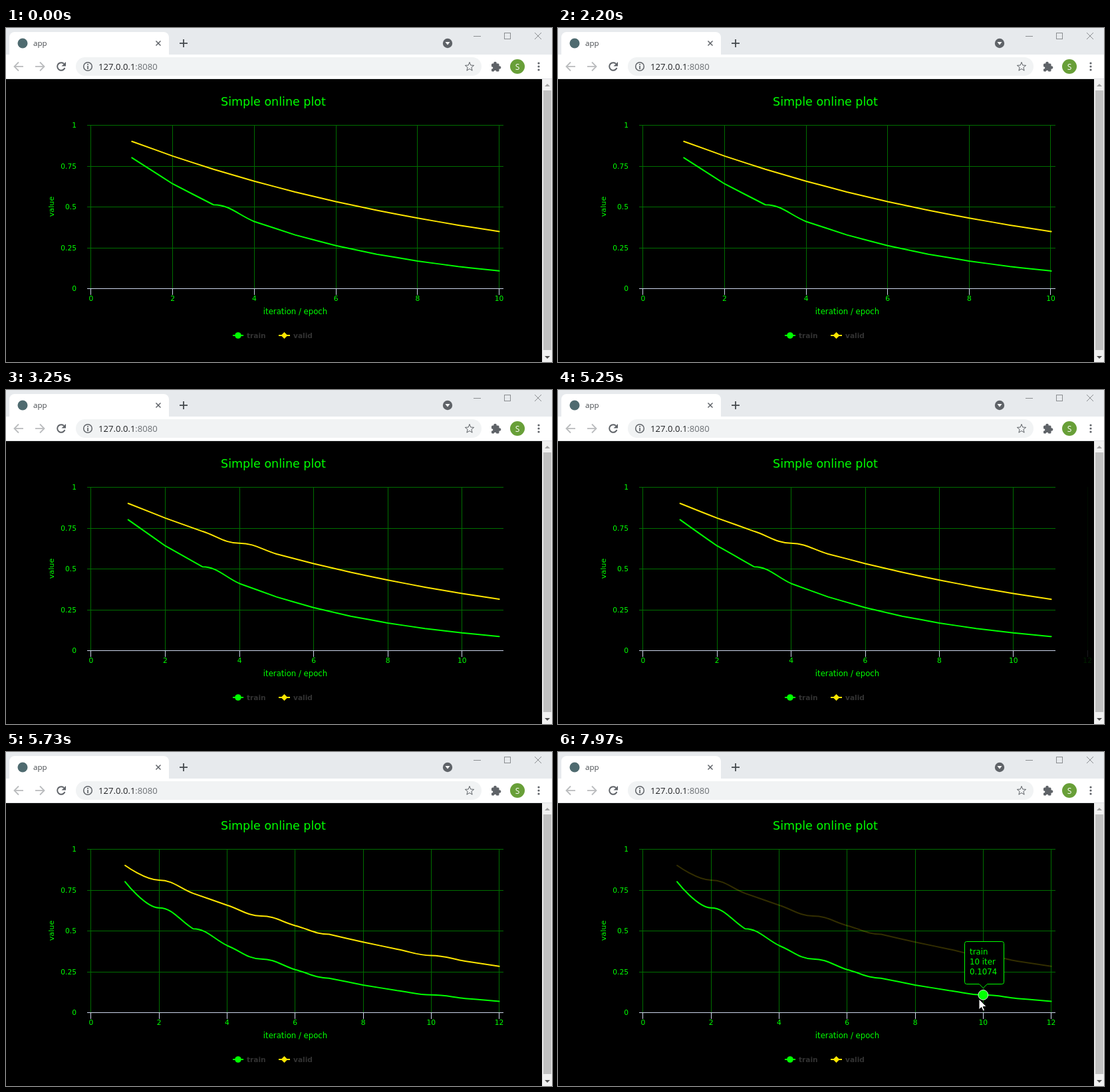
These frames come from a looping animation (821x503 px, 8 s). An HTML page with a canvas:

```html
<!DOCTYPE html>
<html lang="en">
<head>
<meta charset="utf-8">
<title>app</title>
<style>
  html, body { margin: 0; width: 100%; height: 100%; overflow: hidden; background: #000; }
  canvas { display: block; }
</style>
</head>
<body>
<canvas id="stage" width="821" height="503"></canvas>
<script>
const ctx = document.getElementById('stage').getContext('2d');
const LOOP = 8000, STEP = 68.5;
const GREEN = '#00ff00', YELLOW = '#ffe600', GRID = '#006e00', AXIS = '#ccd6eb', ICON = '#5f6368';
const CHART_FONT = '"DejaVu Sans", sans-serif', UI_FONT = '"Open Sans", sans-serif';

// ---------- helpers ----------
const mix = (a, b, k) => a + (b - a) * k;
const clamp01 = v => Math.max(0, Math.min(1, v));
const easeSine = v => (1 - Math.cos(Math.PI * clamp01(v))) / 2;
const crisp = v => Math.floor(v) + 0.5;

function line(points, color, width = 1) {
  ctx.beginPath();
  points.forEach(([x, y]) => ctx.lineTo(x, y));
  ctx.strokeStyle = color;
  ctx.lineWidth = width;
  ctx.stroke();
}
function polygon(points, fill, stroke) {
  ctx.beginPath();
  points.forEach(([x, y]) => ctx.lineTo(x, y));
  ctx.closePath();
  paint(fill, stroke);
}
function paint(fill, stroke, width = 1) {
  if (fill) { ctx.fillStyle = fill; ctx.fill(); }
  if (stroke) { ctx.strokeStyle = stroke; ctx.lineWidth = width; ctx.stroke(); }
}
function circle(x, y, r, fill, stroke, width) {
  ctx.beginPath();
  ctx.arc(x, y, r, 0, Math.PI * 2);
  paint(fill, stroke, width);
}
function rect(x, y, w, h, fill) {
  ctx.fillStyle = fill;
  ctx.fillRect(x, y, w, h);
}
function pill(x, y, w, h, radii, fill) {
  ctx.beginPath();
  ctx.roundRect(x, y, w, h, radii);
  paint(fill);
}
function text(str, x, y, size, color, align = 'left', family = CHART_FONT, weight = '') {
  ctx.font = `${weight} ${size}px ${family}`;
  ctx.textAlign = align;
  ctx.fillStyle = color;
  ctx.fillText(str, x, y);
}
const diamond = (x, y, r, fill, stroke) =>
  polygon([[x, y - r], [x + r, y], [x, y + r], [x - r, y]], fill, stroke);

// ---------- browser window ----------
function drawBrowser() {
  rect(0, 0, 821, 40, '#e7eaed');
  pill(5, 6, 240, 40, [8, 8, 0, 0], '#fff');
  rect(0, 40, 821, 37, '#fff');
  rect(0, 76, 821, 1, '#dfe1e3');

  circle(25, 23, 7.5, '#4f6b70');
  text('app', 41, 27, 11.5, '#45494d', 'left', UI_FONT);
  line([[225.5, 19.5], [232.5, 26.5]], ICON, 1.5);
  line([[232.5, 19.5], [225.5, 26.5]], ICON, 1.5);
  line([[261, 23], [273, 23]], '#45494d', 1.8);
  line([[267, 17], [267, 29]], '#45494d', 1.8);

  circle(664, 23, 7.2, ICON);
  polygon([[660.5, 21], [667.5, 21], [664, 25.5]], '#fff');
  line([[703, 12.5], [714, 12.5]], '#8b8e91');
  ctx.strokeStyle = '#8b8e91';
  ctx.strokeRect(749.5, 7.5, 9, 9);
  line([[795, 7], [805, 17]], '#8b8e91');
  line([[805, 7], [795, 17]], '#8b8e91');

  for (const [x, dir] of [[19, -1], [51, 1]]) {
    line([[x - 7 * dir, 58], [x + 6 * dir, 58]], '#babcbe', 1.8);
    line([[x, 51.5], [x + 6.5 * dir, 58], [x, 64.5]], '#babcbe', 1.8);
  }
  ctx.beginPath();
  ctx.arc(83, 58, 5.8, 0.35, Math.PI * 1.75);
  paint(null, ICON, 2);
  polygon([[90, 51], [90, 57.5], [83.5, 57.5]], ICON);

  pill(105, 44, 610, 28, 14, '#f1f3f4');
  circle(123, 58, 6.3, null, ICON, 1.5);
  rect(122.2, 57, 1.7, 5, ICON);
  rect(122.2, 54, 1.7, 1.8, ICON);
  text('127.0.0.1', 139, 63, 13.1, '#202124', 'left', UI_FONT);
  const hostWidth = ctx.measureText('127.0.0.1').width;
  text(':8080', 139 + hostWidth, 63, 13.1, '#6b6f73', 'left', UI_FONT);

  const star = Array.from({ length: 10 }, (_, i) => {
    const a = -Math.PI / 2 + i * Math.PI / 5, r = i % 2 ? 3 : 7;
    return [697 + r * Math.cos(a), 58.5 + r * Math.sin(a)];
  });
  polygon(star, null, ICON);

  pill(730, 53.5, 11.5, 12, 1.5, ICON);
  circle(735.5, 53, 2.3, ICON);
  circle(742, 59.5, 2.3, ICON);
  circle(730.5, 60, 1.8, '#fff');
  circle(735.5, 65.5, 1.8, '#fff');

  circle(769, 58, 11, '#689f38');
  text('S', 769, 62.5, 12, '#fff', 'center', UI_FONT);
  for (const y of [53, 58, 63]) circle(801, y, 1.6, ICON);

  rect(0, 77, 806, 426, '#000');
  rect(806, 77, 15, 426, '#f1f1f1');
  rect(808, 94, 12, 391, '#c1c1c1');
  polygon([[810, 88], [818, 88], [814, 84]], '#a3a3a3');
  polygon([[810, 494], [818, 494], [814, 498]], '#505050');
}

// ---------- chart ----------
const xAt = (n, max) => 127.9 + n * 613.7 / max;
const yAt = v => 392.3 - 246.2 * v;

// "flat" lists the points whose left (L) or right (R) handle is level, per point count.
const series = {
  train: {
    color: GREEN, value: n => 0.8 ** n,
    flat: { 10: { 3: 'R' }, 11: { 3: 'R' }, 12: { 2: 'LR', 3: 'R', 5: 'LR', 7: 'L', 10: 'LR' } }
  },
  valid: {
    color: YELLOW, value: n => 0.9 ** n,
    flat: { 10: {}, 11: { 4: 'LR' }, 12: { 2: 'LR', 5: 'LR', 7: 'L', 10: 'LR' } }
  }
};

function curveSegments({ value, flat }, count, padTo) {
  const point = n => [xAt(n, count), yAt(value(n))];
  const handle = (n, towards, side) => {
    if (n === 1 || n === count) return point(n);
    const [x, y] = point(n), [ox, oy] = point(towards);
    const level = (flat[count][n] || '').includes(side);
    return [mix(x, ox, 0.4), level ? y : mix(y, oy, 0.4)];
  };
  const segments = [];
  for (let n = 2; n <= padTo; n++) {
    const last = point(count);
    segments.push(n > count ? [...last, ...last, ...last]
      : [...handle(n - 1, n, 'R'), ...handle(n, n - 1, 'L'), ...point(n)]);
  }
  return segments;
}

function drawSeries(s, from, to, k, opacity) {
  const start = curveSegments(s, from, to), end = curveSegments(s, to, to);
  ctx.globalAlpha = opacity;
  ctx.beginPath();
  ctx.moveTo(mix(xAt(1, from), xAt(1, to), k), yAt(s.value(1)));
  end.forEach((seg, i) => ctx.bezierCurveTo(...seg.map((v, j) => mix(start[i][j], v, k))));
  ctx.lineJoin = ctx.lineCap = 'round';
  paint(null, s.color, 2);
  ctx.lineJoin = 'miter';
  ctx.lineCap = 'butt';
  ctx.globalAlpha = 1;
}

function drawAxes(from, to, k) {
  text('Simple online plot', 402, 117, 17.5, GREEN, 'center');
  text('iteration / epoch', 435, 431, 11.7, GREEN, 'center');
  ctx.save();
  ctx.translate(72, 269);
  ctx.rotate(-Math.PI / 2);
  text('value', 0, 0, 11.2, GREEN, 'center');
  ctx.restore();

  for (const v of [0.25, 0.5, 0.75, 1]) {
    const y = crisp(392.9 - 246.4 * v);
    line([[122, y], [748, y]], GRID);
  }
  for (const v of [0, 0.25, 0.5, 0.75, 1])
    text(String(v), 106, crisp(392.9 - 246.4 * v) + 3.5, 10.7, GREEN, 'right');

  for (let n = 0; n <= to; n += 2) {
    const x = mix(xAt(n, from), xAt(n, to), k);
    ctx.globalAlpha = n > from ? mix(0.1, 1, k) : 1;
    line([[crisp(x), 146], [crisp(x), 392]], GRID);
    line([[crisp(x), 392], [crisp(x), 402]], AXIS);
    text(String(n), x, 411, 10.7, GREEN, 'center');
  }
  ctx.globalAlpha = 1;
  line([[122, 392.5], [748, 392.5]], AXIS);
}

function drawLegend() {
  line([[341, 463], [357, 463]], GREEN, 2);
  circle(349, 463, 4.8, GREEN);
  text('train', 362, 467, 10.6, '#333', 'left', CHART_FONT, 'bold');
  line([[410, 463], [427, 463]], YELLOW, 2);
  diamond(418.5, 463, 5, YELLOW);
  text('valid', 432, 467, 10.6, '#333', 'left', CHART_FONT, 'bold');
}

// ---------- pointer and tooltip ----------
const hovers = [
  { at: 6130, name: 'valid', n: 12 },
  { at: 6990, name: 'valid', n: 11 },
  { at: 7190, name: 'valid', n: 10 },
  { at: 7690, name: 'train', n: 10 }
];
const pointerPath = [
  [5930, 808, 342], [6000, 779, 339], [6070, 752, 334], [6200, 734, 329], [6800, 722, 326],
  [6900, 722, 326], [7400, 641, 319], [7650, 641, 319], [7910, 633, 372], [8000, 633, 372]
];
const anchor = h => [xAt(h.n, 12), yAt(series[h.name].value(h.n))];

function drawMarker(h) {
  const [x, y] = anchor(h);
  if (h.name === 'valid') {
    circle(x, y, 10, 'rgba(255,230,0,0.25)');
    diamond(x, y, 7, YELLOW, '#fff');
  } else {
    circle(x, y, 7.4, GREEN, '#d8e8d8');
  }
}

function drawTooltip(h, previous, t) {
  const target = anchor(h), origin = previous ? anchor(previous) : target;
  const k = 1 - Math.exp(-(t - h.at) / 55);
  const x = mix(origin[0], target[0], k), y = mix(origin[1], target[1], k);
  const left = crisp(Math.min(x - 27.5, 697.5)), top = crisp(y - 79), right = left + 59, bottom = top + 64;
  ctx.beginPath();
  ctx.moveTo(left + 3, top);
  ctx.arcTo(right, top, right, bottom, 3);
  ctx.arcTo(right, bottom, left, bottom, 3);
  ctx.lineTo(x + 6, bottom);
  ctx.lineTo(x, bottom + 6);
  ctx.lineTo(x - 6, bottom);
  ctx.arcTo(left, bottom, left, top, 3);
  ctx.arcTo(left, top, right, top, 3);
  ctx.closePath();
  paint('#000', GREEN);
  [h.name, `${h.n} iter`, series[h.name].value(h.n).toFixed(4)]
    .forEach((row, i) => text(row, left + 7.5, top + 19.5 + 15 * i, 11.8, GREEN));
}

function drawPointer(t) {
  const i = pointerPath.findIndex(p => p[0] > t);
  if (i < 1) return;
  const a = pointerPath[i - 1], b = pointerPath[i];
  const k = (t - a[0]) / (b[0] - a[0]);
  const x = mix(a[1], b[1], k), y = mix(a[2], b[2], k);
  const arrow = [[0, 0], [0, 16], [3.7, 12.6], [6.2, 18.2], [8.6, 17.1], [6.2, 11.7], [11.2, 11.4]];
  polygon(arrow.map(([dx, dy]) => [x + dx, y + dy]), '#fff', '#000');
}

// ---------- timeline ----------
function heldTime(t) {
  const start = t >= 5250 ? 5250 : 2200;
  return t < start ? 0 : start + Math.floor((t - start) / STEP) * STEP;
}

function draw(time) {
  const t = heldTime(time);
  const second = t >= 5250;
  const from = second ? 11 : 10, to = from + 1;
  const k = easeSine((t - (second ? 5202 : 2165)) / 500);
  const index = hovers.findLastIndex(h => t >= h.at);
  const hover = hovers[index];

  ctx.clearRect(0, 0, 821, 503);
  drawBrowser();
  drawAxes(from, to, k);
  for (const name in series)
    drawSeries(series[name], from, to, k, hover && hover.name !== name ? 0.2 : 1);
  drawLegend();
  if (hover) {
    drawMarker(hover);
    drawTooltip(hover, hovers[index - 1], t);
  }
  drawPointer(t);
}

function frame() {
  draw(performance.now() % LOOP);
  requestAnimationFrame(frame);
}
frame();
</script>
</body>
</html>
```
